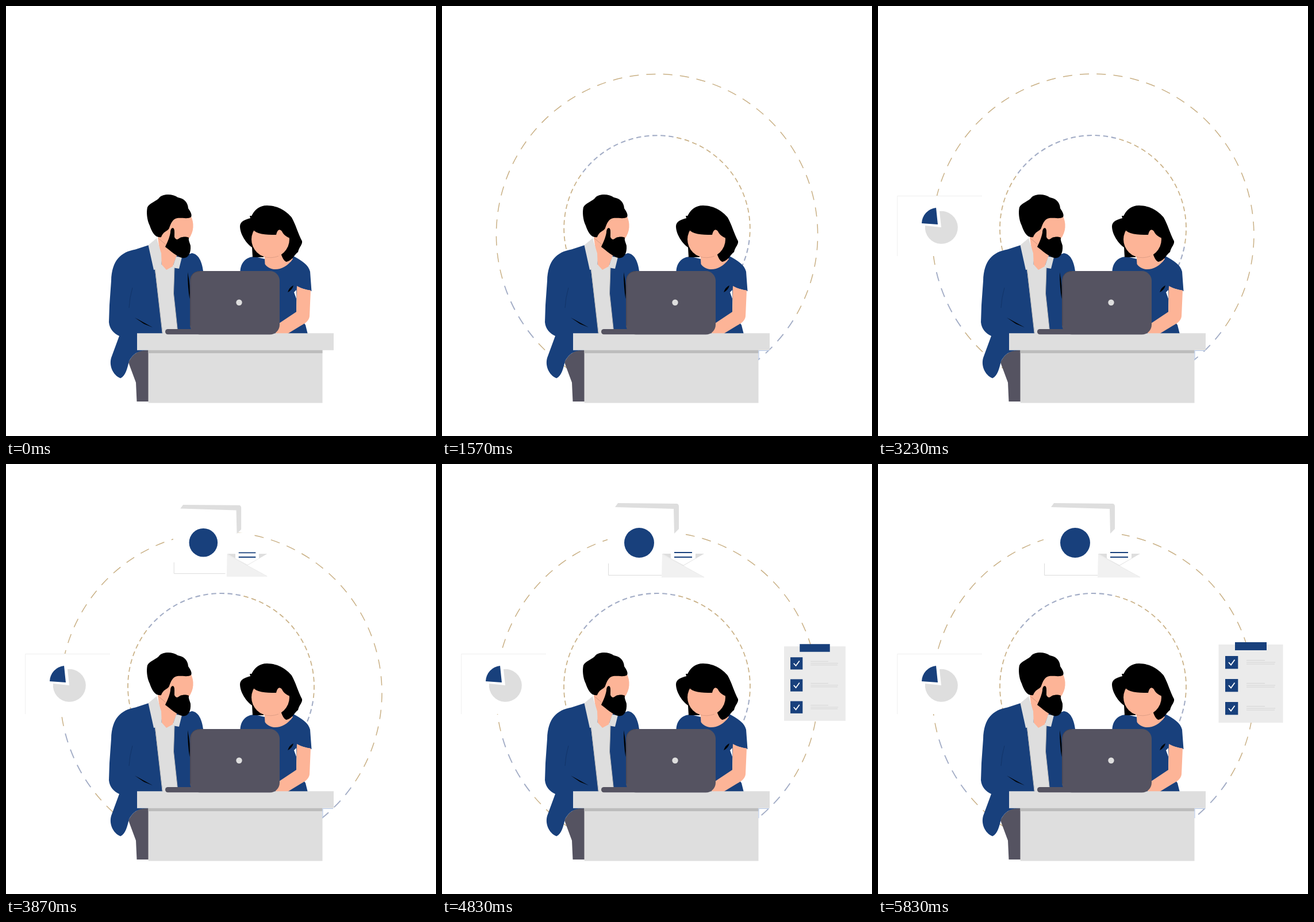
Recreate the animation shown at these times as an HTML page with a canvas. Size 748x748 px, loop 5.86 s.

```html
<!DOCTYPE html>
<html lang="en">
<head>
<meta charset="utf-8">
<title>Team at a desk</title>
<style>
html, body { margin: 0; width: 100%; height: 100%; overflow: hidden; background: #fff; }
canvas { display: block; width: 100vw; height: 100vh; }
</style>
</head>
<body>
<canvas id="stage" width="748" height="748"></canvas>
<script>
const LOOP = 5860;
const BLUE = '#18407c', SKIN = '#fdb497', GREY = '#dedede', SLATE = '#555361';
const TAN = '#c9b085', PALE = '#a3adc6';
const ctx = document.getElementById('stage').getContext('2d');

// Scale of each pop-in: [time, scale] steps
const pieSteps = [[2510, 0], [2800, 0.42], [3080, 1], [3130, 1.014], [3200, 1]];
const popSteps = start => [
  [start, 0], [start + 220, 0.91], [start + 290, 1.05],
  [start + 450, 0.954], [start + 600, 1]
];
const pageSteps = popSteps(3420), listSteps = popSteps(4380);

function track(steps, t) {
  if (t <= steps[0][0]) return 0;
  for (let i = 1; i < steps.length; i++) {
    const [t0, a] = steps[i - 1], [t1, b] = steps[i];
    if (t < t1) {
      const k = (t - t0) / (t1 - t0);
      const e = i === 1 ? k : (1 - Math.cos(Math.PI * k)) / 2;
      return a + (b - a) * e;
    }
  }
  return 1;
}

function elastic(k) {
  if (k <= 0) return 0;
  if (k >= 1) return 1;
  return 1 + 2 ** (-10 * k) * Math.sin((k - 0.125) * 4 * Math.PI);
}

function fill(d, color) {
  ctx.fillStyle = color;
  ctx.fill(new Path2D(d));
}

function line(d, color, width = 1) {
  ctx.strokeStyle = color;
  ctx.lineWidth = width;
  ctx.stroke(new Path2D(d));
}

function rect(x, y, w, h, color, r = 0) {
  ctx.fillStyle = color;
  ctx.beginPath();
  ctx.roundRect(x, y, w, h, r);
  ctx.fill();
}

function disc(x, y, r, color) {
  ctx.fillStyle = color;
  ctx.beginPath();
  ctx.arc(x, y, r, 0, 2 * Math.PI);
  ctx.fill();
}

function scaled(x, y, s, draw) {
  if (s <= 0) return;
  ctx.save();
  ctx.translate(x, y);
  ctx.scale(s, s);
  ctx.translate(-x, -y);
  draw();
  ctx.restore();
}

// Angles are in degrees, clockwise from the top
function ring(cy, r, step, dash, phase, width, isPale) {
  const rad = a => (a - 90) * Math.PI / 180;
  for (let a = phase % step; a < 360; a += step) {
    const pale = isPale((a + dash / 2) % 360);
    ctx.strokeStyle = pale ? PALE : TAN;
    ctx.lineWidth = width + (pale ? 0.4 : 0);
    ctx.beginPath();
    ctx.arc(374, cy, r, rad(a), rad(a + dash));
    ctx.stroke();
  }
}

function rings(t) {
  const turn = 2.15 + 0.0356 * (t - 1570) + 360;
  scaled(374, 398, elastic((t - 1030) / 560), () => {
    ring(398, 279.9, 6, 3.3, turn, 1.5,
      a => (a > 123 && a < 180) || (a > 231 && a < 255));
    ring(387, 162, 5, 3, turn, 1.7,
      a => a > 306 || a < 13 || (a > 98 && a < 180));
  });
}

function pieCard() {
  rect(33, 330, 148, 105, '#fff');
  line('M33.5 435V330.5H181', '#efefef');
  fill('M110 385L82 382A28.5 28.5 0 1 0 107 357Z', GREY);
  fill('M104 380L76 378A28 28 0 0 1 101 351Z', BLUE);
}

function page() {
  rect(288, 75, 116, 119, '#fff');
  fill('M403 119H424V160H403Z', '#fff');
  fill('M301 75L306 68L409 69Q412 70 412 74V113L404 121L403 78Z', GREY);
  line('M289.5 173V193.5H383', '#dcdcdc');
  disc(343, 137, 26, BLUE);
}

function envelope() {
  fill('M420 125L456 156V198H382V156Z', '#fff');
  fill('M383 156H456L420 177Z', GREY);
  fill('M398 146H441V164L420 176L398 164Z', '#fff');
  fill('M383 157L456 197.5H382Z', '#f1f1f1');
  line('M383 157L456 197', '#e2e2e2', 0.8);
  line('M404 154H435M404 162H435', BLUE, 2);
}

function listCard() {
  rect(592.5, 314, 112, 136, '#ebebeb');
  rect(621, 310, 55, 14, BLUE);
  for (let i = 0; i < 3; i++) {
    const y = 334 + i * 40;
    rect(604, y, 22.3, 22.3, BLUE);
    line(`M610 ${y + 11}L614 ${y + 15.5}L620.5 ${y + 6.5}`, '#fff', 1.8);
    line(`M641 ${y + 7.5}H673M641 ${y + 11}H691M641 ${y + 14}H690`, '#d5d5d5');
  }
}

function man() {
  fill('M213 620C221 604 232 598 248 598V688H227.5L226 655Z', SLATE);
  fill('M248 416L225 423.5C200 428 184 442 183 478L180 520L179 550' +
    'C180 562 188 570 197 574L183 612C179 626 186 642 199 647.5' +
    'C208 644 211 630 214 618C222 603 232 599 247 599V570H322' +
    'L343 470V461C341 445 335 431 323 430L305 437Z', BLUE);
  fill('M258 450L293 450L291.5 500L299 571H272.5Z', GREY);
  line('M293 456L291.5 500L298.5 565M259.5 458L272 569', '#b9b9b9');
  fill('M264 403L275 392L300 428L296 437L290 453L279 459L271 450Z', SKIN);
  fill('M247.5 416L262 404L270 430L271 456L257 459Z', GREY);
  fill('M296 436L306 437L301 457L289.5 455Z', GREY);
  fill('M280 364H321C328 377 327 393 318 405L300 412L278 419L267 403Z', SKIN);
  line('M265 404L278 415', '#c98f78', 0.8);
  fill('M270 402C260 404 254 394 250 382C245 372 244 358 246 350' +
    'C250 342 262 340 267 333C273 327 289 326 299 333' +
    'C310 335 316 341 317 352C321 358 324 363 322 367' +
    'C318 371 305 368 298 369C290 370 287 378 284 386' +
    'C282 392 274 391 270 402Z', '#000');
  fill('M290 386C294 387 293 393 293 402C296 408 299 406 303 403' +
    'C308 401 315 401 318 403C317 408 320 412 321 417' +
    'C322 430 317 439 308 438.5C298 437 285 425 277 419' +
    'C280 412 284 405 286 394C286 389 288 386 290 386Z', '#000');
  fill('M224 542L255 559L240 553Z', '#000');
  fill('M316 463Q321 486 319.5 510Q316 490 316 463Z', '#000');
  line('M220 490Q215 507 214 525', '#123468');
}

function woman() {
  fill('M407.5 462C408 447 417 436 433 436L450 440L498 434' +
    'C515 443 526 450 529 462L531.5 496L506 489L505 533L521 555L525 571H460Z', BLUE);
  fill('M501 498L505 494V509Z', '#fff');
  fill('M506 487Q519 494 530 494.5L528 540C527 548 519 553 513 556' +
    'L490 570H469V556L505 532Z', SKIN);
  fill('M449.5 433L450.5 449C461 464 485 460 499 440L490 430Z', SKIN);
  fill('M407 383C407 375 416 371 426 369C430 355 441 347 454 347' +
    'C474 347 489 358 497 368C504 380 508 396 515 409' +
    'C516 415 510 419 508 428C502 432 498 443 488 445' +
    'C484 444 481 439 478 430L448 425V437H429L428 420' +
    'C418 413 407 397 407 383Z', '#000');
  ctx.fillStyle = SKIN;
  ctx.beginPath();
  ctx.ellipse(460, 406, 33, 32, 0, 0, 2 * Math.PI);
  ctx.fill();
  line('M448 436Q461 440 474 435', '#d99a82', 0.8);
  fill('M424 365H490L500 406C492 403 484 401 480 392C476 387 472 389 470 398' +
    'C450 398 436 397 430 389Z', '#000');
  fill('M490 498Q493 489 500 486Q498 494 490 498Z', '#000');
}

function desk() {
  rect(247.5, 598, 303, 92.5, GREY);
  rect(247.5, 598, 303, 6, '#bcbcbc');
  rect(228, 569.3, 342, 29.5, GREY);
}

function laptop() {
  rect(277, 562, 60, 9.3, SLATE, 4.5);
  rect(320, 461, 156, 110.5, SLATE, 17);
  line('M321 556V478Q321 462 337 461.5', '#42404d', 0.8);
  disc(405.5, 515.7, 5.2, GREY);
}

function draw(t) {
  const pop = track(pageSteps, t);
  ctx.fillStyle = '#fff';
  ctx.fillRect(0, 0, 748, 748);
  rings(t);
  scaled(107, 382.5, track(pieSteps, t), pieCard);
  scaled(350, 131, pop, page);
  scaled(420, 163, pop, envelope);
  scaled(648.7, 382, track(listSteps, t), listCard);
  man();
  woman();
  desk();
  laptop();
  if (t > 1060) line('M551 616V599.5H569', '#b4c8ea');
}

const start = performance.now();
function tick() {
  draw((performance.now() - start) % LOOP);
  requestAnimationFrame(tick);
}
tick();
</script>
</body>
</html>
```
